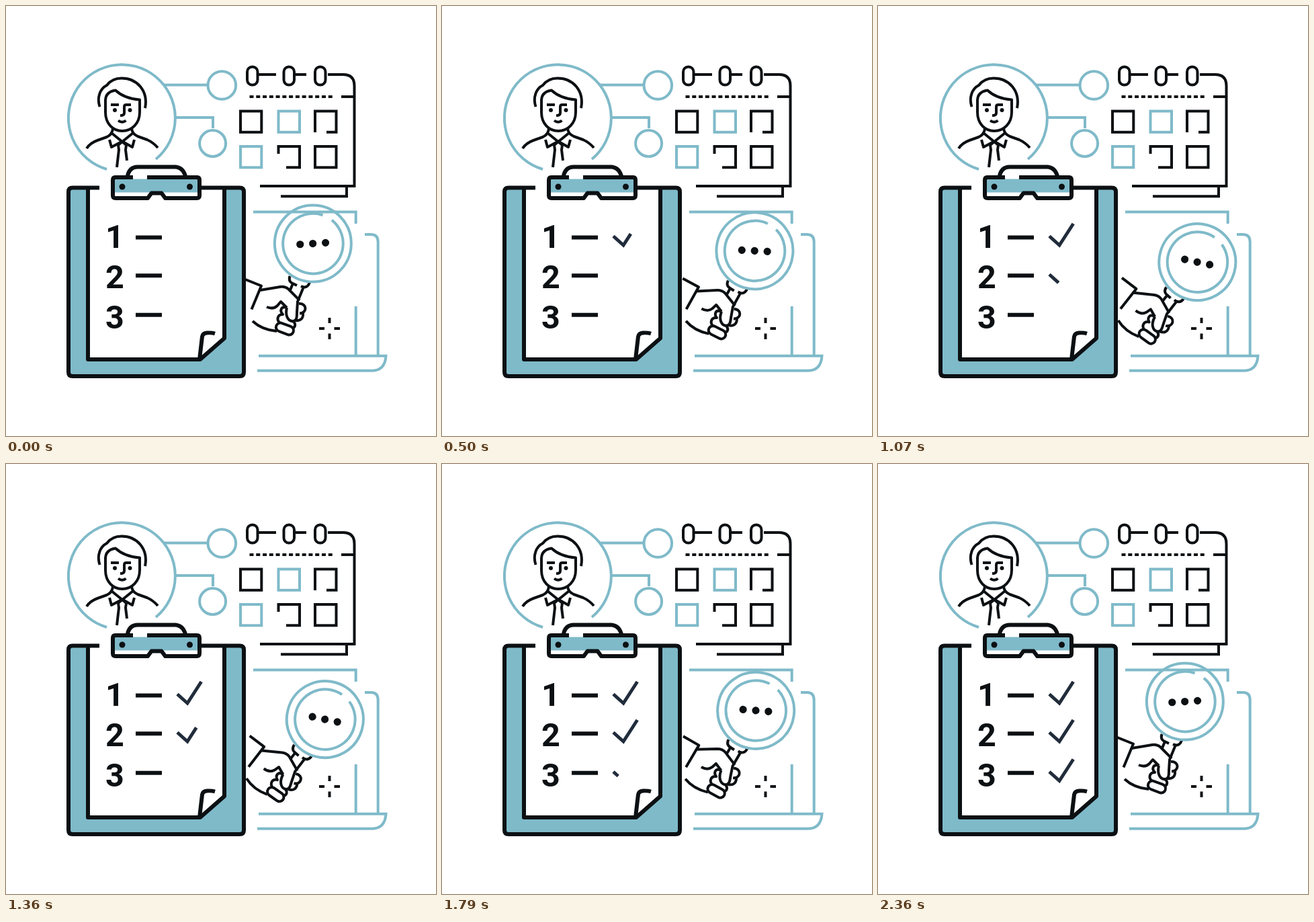
Recreate the animation shown at these times as an HTML page. Size 640 px wide and 640 px high, loop 2430 ms.

```html
<!DOCTYPE html>
<html lang="en">
<head>
<meta charset="utf-8">
<title>Checklist</title>
<style>
  html, body { margin: 0; width: 100%; height: 100%; overflow: hidden; background: #fff; }
  svg { display: block; width: 100vw; height: 100vh; }
  .ink, .teal, .check { fill: none; stroke-width: 4; }
  .ink { stroke: #0c1013; }
  .teal { stroke: #7fbac9; }
  .check { stroke: #212c3b; stroke-width: 5; }
  .bold { stroke-width: 6; stroke-linejoin: round; }
  .round { stroke-linejoin: round; }
  .dot { fill: #0c1013; stroke: none; }
  .fill { fill: #7fbac9; stroke: none; }
  .paper { fill: #fff; stroke: none; }
  text { font: 700 48.5px Roboto, Arial, sans-serif; fill: #0c1013; }
</style>
</head>
<body>
<svg viewBox="0 0 640 640">
  <!-- profile -->
  <g class="teal">
    <path d="M150 243A79.5 79.5 0 1 1 223 228"/>
    <path d="M234 117.5H300M251 166H308V182"/>
    <circle cx="321.3" cy="118" r="20.8"/>
    <circle cx="307.6" cy="204.5" r="19.5"/>
  </g>
  <g class="ink round">
    <path d="M139.500 150C135 136 140 123 150 118C156 110 163 107.500 172 107.500C195 107.500 212 126 207 152"/>
    <path d="M148 139V158C148 175 159 186 173 186C187 186 199 175 199 158V139.500C184 138.500 171 133 163 125.500C153 127 148 132 148 141"/>
    <path d="M156 147H168M186 147H179Q176 147 176 150V159Q176 163 170 163"/>
    <path d="M167 170.500Q173 175 178.500 170.500"/>
    <path d="M120 212Q125 204 136 200L150 195Q159 191 159 181M187 181Q187 190 196 194L210 199Q219 203 226 211"/>
    <path d="M157 189L173 202L189 189M154 199L157 210L173 201.500L188 210L191 199"/>
    <path d="M173 202L167 207L168 214L165 240M173 202L179 207L178 214L180 230"/>
  </g>
  <g class="dot">
    <circle cx="162" cy="155" r="3"/>
    <circle cx="184.500" cy="155" r="3"/>
  </g>

  <!-- calendar -->
  <g class="ink">
    <rect x="359" y="90.500" width="15.500" height="27" rx="7.500"/>
    <rect x="413.500" y="90.500" width="15.500" height="27" rx="7.500"/>
    <rect x="460" y="90.500" width="15.500" height="27" rx="7.500"/>
    <path d="M375 102H402M429 102H447M479 102H502Q518.500 102 518.500 119V268H378M499 135H518"/>
    <path d="M507 268V283.300H409"/>
    <path d="M362.500 135H486" stroke-dasharray="6 3.770"/>
    <rect x="349" y="156.500" width="31.300" height="31.300"/>
    <path d="M460 188V156.500H491.500V187.800H477"/>
    <path d="M405.500 220V209H437V240.300H417"/>
    <rect x="460" y="209" width="31.500" height="31.300"/>
  </g>
  <g class="teal">
    <rect x="405.500" y="156.500" width="31.500" height="31.300"/>
    <rect x="349" y="209" width="31.300" height="31.300"/>
  </g>

  <!-- laptop -->
  <g class="teal">
    <path d="M368 306.500H520.700V324M520.700 447V520"/>
    <path d="M534 340H543Q553.700 340 553.700 351V520"/>
    <path d="M376 520.800H565.500Q564 542.800 544 542.800H374"/>
  </g>
  <path class="ink" d="M466 480H474M488.500 480H497M481.500 464V472M481.500 487.500V496"/>

  <!-- hand with magnifier -->
  <g id="hand">
    <g class="ink round">
      <path d="M355 406.500L380 416.500L365.500 451.500"/>
      <path d="M378 423L408 418Q415 417 420 421L437 438"/>
      <path d="M367 469Q381 482 403 484"/>
      <path d="M388 448Q398 452 404 446L409 440L418 449"/>
      <path d="M418 449C415 461 420 470 428 469C433 468 433 462 433 456L434 440L443 418"/>
      <path d="M436 443C448 442 449 457 437 457.500M442 457C443 466 437 469 431 468"/>
      <path d="M418 449C409 446 407 454 412 459C404 459 402 467 408 472M427 469C432 473 431 478 426 480"/>
      <rect x="401.500" y="474" width="27" height="13" rx="6.500" transform="rotate(20 415 480.500)"/>
      <path d="M422.500 402C420 409 424 412 427 413L433 416M452 411C450 418 445 420 439 417M427 413L422.500 424"/>
    </g>
    <g class="teal">
      <circle cx="456.800" cy="353.500" r="57"/>
      <path d="M471.500 311.200A44.800 44.800 0 1 0 484.800 318.500"/>
    </g>
    <g class="dot">
      <circle cx="437.700" cy="354.700" r="5.600"/>
      <circle cx="456.600" cy="353.500" r="5.600"/>
      <circle cx="475.500" cy="352.300" r="5.600"/>
    </g>
  </g>

  <!-- clipboard -->
  <path class="fill" d="M93 271H122V526H289L325 495V271H354V551H93Z"/>
  <path class="paper" d="M122 271H325V495L289 526H122Z"/>
  <g class="ink bold">
    <path d="M139 270.500H99Q93 270.500 93 276.500V545Q93 551 99 551H348Q354 551 354 545V276.500Q354 270.500 348 270.500H289"/>
    <path d="M122 271V526H289L325 494.500V271"/>
    <path d="M288 526L292 492Q293 487 299 486.500Q306 486 311 487.500"/>
  </g>
  <path class="paper" d="M159 255H288V286H237L232 278H217L210 286H159Z"/>
  <rect class="fill" x="161" y="257.500" width="125" height="20"/>
  <g class="ink bold">
    <path d="M180.500 255Q183 239.500 196 239.500H252Q264 240 267.500 255"/>
    <path d="M189 255H163Q159 255 159 259V282Q159 286 163 286H211L216.500 278.500H231.500L237 286H284Q288 286 288 282V259Q288 255 284 255H210"/>
    <path d="M193 344.500H232M193 401.300H232M193 459.800H232"/>
  </g>
  <g class="dot">
    <circle cx="173" cy="269" r="4.500"/>
    <circle cx="273.500" cy="269" r="4.500"/>
  </g>
  <text x="148" y="360">1</text>
  <text x="148" y="420">2</text>
  <text x="148" y="480">3</text>
  <g id="checks"></g>
</svg>
<script>
  const LOOP = 2430, STEPS = 34, SWING = 16, DRAW = 8.9;
  const hand = document.getElementById('hand');
  const box = document.getElementById('checks');

  const checks = [342.5, 399.5, 458].map((y, i) => {
    const el = document.createElementNS('http://www.w3.org/2000/svg', 'path');
    el.setAttribute('class', 'check');
    el.setAttribute('pathLength', 1);
    el.setAttribute('d', `M255 ${y}l15 13.500l20.700 -32`);
    box.append(el);
    return { el, start: 0.85 + i * STEPS / 3 };
  });

  function render(t) {
    const step = Math.floor((t + 5) * STEPS / LOOP) % STEPS;
    const turn = SWING * (1 - Math.cos((step + 0.5) / STEPS * 2 * Math.PI)) / 2;
    hand.setAttribute('transform', `rotate(${turn} 366 434.500)`);
    for (const { el, start } of checks) {
      const p = Math.min(1, Math.max(0, (step - start) / DRAW));
      el.setAttribute('visibility', p > 0 ? 'visible' : 'hidden');
      el.setAttribute('stroke-dasharray', p < 1 ? `${p} 2` : 'none');
    }
  }

  const begin = performance.now();
  function tick() {
    render((performance.now() - begin) % LOOP);
    requestAnimationFrame(tick);
  }
  render(0);
  requestAnimationFrame(tick);
</script>
</body>
</html>
```
